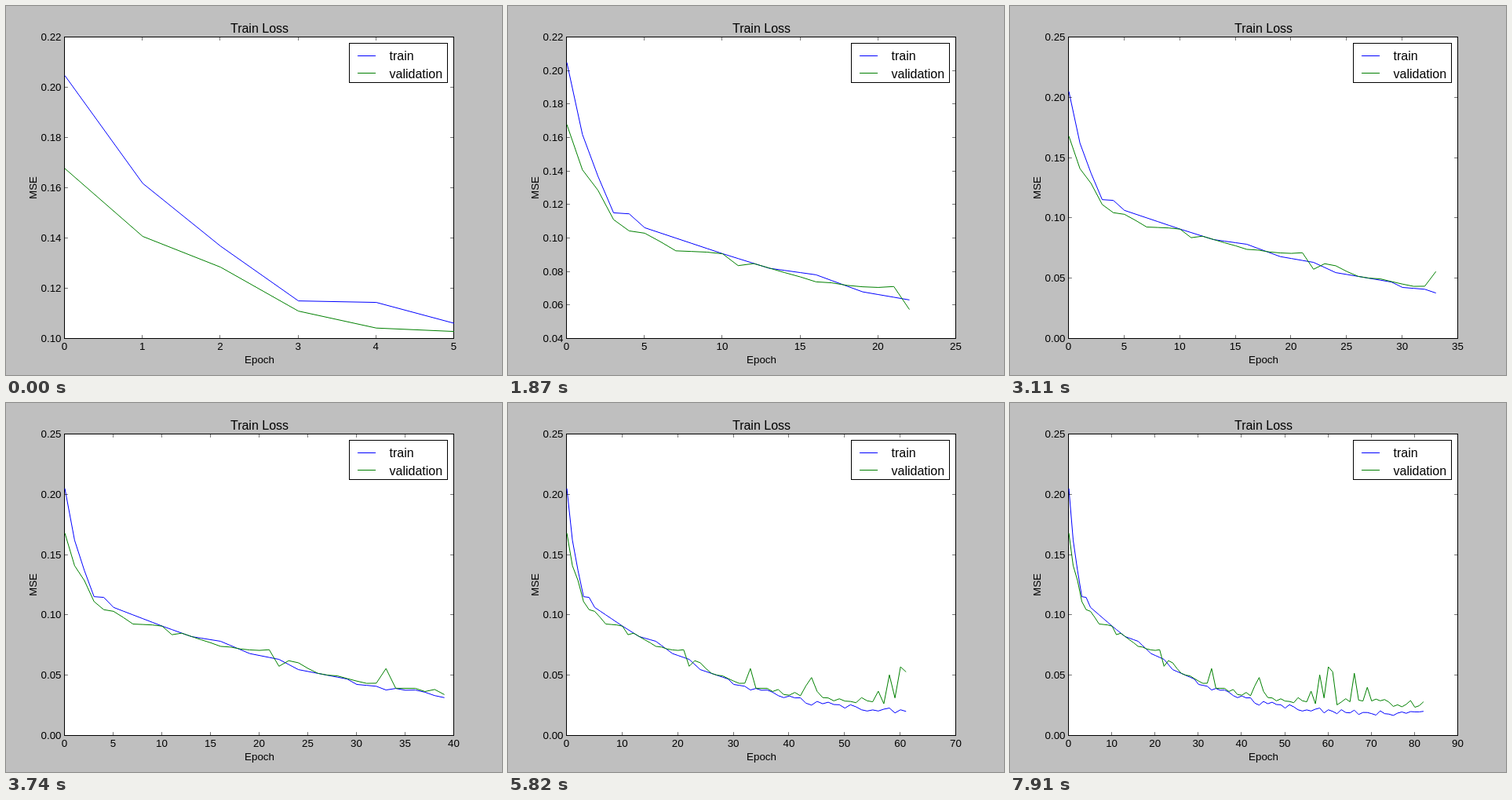
Animation, 632 px wide and 470 px high, one loop 8 s. Source, as an HTML page with a canvas:

```html
<!DOCTYPE html>
<html lang="en">
<head>
<meta charset="utf-8">
<title>Train Loss</title>
<style>
  html, body { margin: 0; width: 100%; height: 100%; overflow: hidden; background: #bfbfbf; }
  canvas { display: block; }
</style>
</head>
<body>
<canvas id="chart" width="632" height="470"></canvas>
<script>
const ctx = document.getElementById('chart').getContext('2d');
const LOOP = 8000, UPDATE = 208.3, UPDATE_OFFSET = 18;
const EPOCHS = 83;
const BLUE = '#0000ff', GREEN = '#008000';
const BOX = { left: 74.5, top: 39.5, right: 570.5, bottom: 423.5 };
const PLOT = { left: 75, bottom: 423, width: 496, height: 384 };

// Straight-line interpolation through [x, y] key points
function interpolate(keys, x) {
  const i = Math.max(1, keys.findIndex(([kx]) => kx >= x));
  const [x0, y0] = keys[i - 1], [x1, y1] = keys[i];
  return y0 + (y1 - y0) * (x - x0) / (x1 - x0);
}

// Repeatable noise between -1 and 1
function noise(i, seed) {
  const s = Math.sin(i * 12.9898 + seed) * 43758.5453;
  return (s - Math.floor(s)) * 2 - 1;
}

// Mean squared error, in units of 0.0001: a falling trend, jitter and a few spikes
const trainTrend = [[0, 2045], [1, 1616], [2, 1366], [3, 1148], [4, 1142], [5, 1059],
  [10, 904], [13, 817], [16, 778], [19, 676], [22, 628], [24, 543], [29, 465],
  [30, 420], [32, 405], [33, 374], [36, 375], [43, 275], [60, 195], [82, 182]];
const validationTrend = [[0, 1675], [1, 1405], [2, 1283], [3, 1109], [4, 1039], [5, 1027],
  [7, 922], [10, 904], [16, 730], [21, 700], [22, 580], [23, 622], [26, 525],
  [32, 422], [36, 380], [42, 325], [50, 295], [82, 255]];
const spikes = { 11: -45, 33: 140, 43: 80, 44: 170, 45: 50, 56: 90, 58: 205, 60: 280, 61: 225, 66: 245, 69: 120 };

const epochs = Array.from({ length: EPOCHS }, (_, i) => i);
const train = epochs.map(i =>
  interpolate(trainTrend, i) + (i > 33 ? 24 * noise(i, 1) : 0));
const validation = epochs.map(i =>
  interpolate(validationTrend, i) + (spikes[i] || 0) + Math.min(30, i / 2) * noise(i, 2));

// Last epoch drawn after a given number of chart updates
const progress = [[0, 5], [4, 13], [15, 33], [38, 82]];

// Smallest round step that covers the data in at most nine intervals
function makeAxis(lo, hi) {
  const step = [1, 2, 5, 10, 20, 50, 100, 200, 500]
    .find(s => Math.floor(lo / s) * s + 9 * s >= hi);
  const min = Math.floor(lo / step) * step;
  const max = Math.ceil(hi / step) * step;
  const ticks = [];
  for (let v = min; v <= max; v += step) ticks.push(v);
  return { min, max, ticks };
}

function stroke(points, color, width) {
  ctx.beginPath();
  points.forEach(([x, y]) => ctx.lineTo(x, y));
  ctx.strokeStyle = color;
  ctx.lineWidth = width;
  ctx.stroke();
}

function text(label, x, y, size, align) {
  ctx.font = `${size}px "Liberation Sans", Arial, sans-serif`;
  ctx.textAlign = align;
  ctx.fillStyle = '#000';
  ctx.fillText(label, x, y);
}

function frameRect(left, top, right, bottom) {
  ctx.fillStyle = '#fff';
  ctx.fillRect(left, top, right - left, bottom - top);
  ctx.strokeStyle = '#000';
  ctx.lineWidth = 1;
  ctx.strokeRect(left, top, right - left, bottom - top);
}

function drawTicks(xAxis, yAxis, px, py) {
  const tick = (x, y, dx, dy) => stroke([[x, y], [x + dx, y + dy]], '#000', 0.55);
  const snap = v => Math.floor(v) + 0.5;
  for (const v of xAxis.ticks) {
    const x = px(v) - 0.5;
    tick(snap(x), BOX.top, 0, 4.4);
    tick(snap(x), BOX.bottom, 0, -4.4);
    text(v, x, 438, 13.33, 'center');
  }
  for (const v of yAxis.ticks) {
    const y = py(v) + 0.5;
    tick(BOX.left, snap(y), 4.4, 0);
    tick(BOX.right, snap(y), -4.4, 0);
    text((v / 10000).toFixed(2), 70.5, y + 4.5, 13.33, 'right');
  }
}

function drawLegend() {
  frameRect(437.5, 47.5, 562.5, 97.5);
  stroke([[448, 63.5], [471, 63.5]], BLUE, 1);
  stroke([[448, 85.5], [471, 85.5]], GREEN, 1);
  text('train', 488.5, 69, 16, 'left');
  text('validation', 488.5, 92, 16, 'left');
}

function draw(time) {
  const update = Math.floor((time + UPDATE_OFFSET) / UPDATE);
  const epoch = Math.round(interpolate(progress, update));
  const series = [[train, BLUE], [validation, GREEN]]
    .map(([data, color]) => [data.slice(0, epoch + 1), color]);
  const values = series.flatMap(([data]) => data);
  const xAxis = makeAxis(0, epoch);
  const yAxis = makeAxis(Math.min(...values), Math.max(...values));
  const px = v => PLOT.left + PLOT.width * v / xAxis.max;
  const py = v => PLOT.bottom - PLOT.height * (v - yAxis.min) / (yAxis.max - yAxis.min);

  ctx.fillStyle = '#bfbfbf';
  ctx.fillRect(0, 0, 632, 470);
  frameRect(BOX.left, BOX.top, BOX.right, BOX.bottom);
  for (const [data, color] of series) {
    stroke(data.map((v, i) => [px(i), py(v)]), color, 1);
  }
  drawTicks(xAxis, yAxis, px, py);
  drawLegend();

  text('Train Loss', 323, 34, 16, 'center');
  text('Epoch', 323, 455, 13.33, 'center');
  ctx.save();
  ctx.translate(38.5, 231.5);
  ctx.rotate(-Math.PI / 2);
  text('MSE', 0, 0, 13.33, 'center');
  ctx.restore();
}

const start = performance.now();
function tickFrame() {
  draw((performance.now() - start) % LOOP);
  requestAnimationFrame(tickFrame);
}
tickFrame();
</script>
</body>
</html>
```
